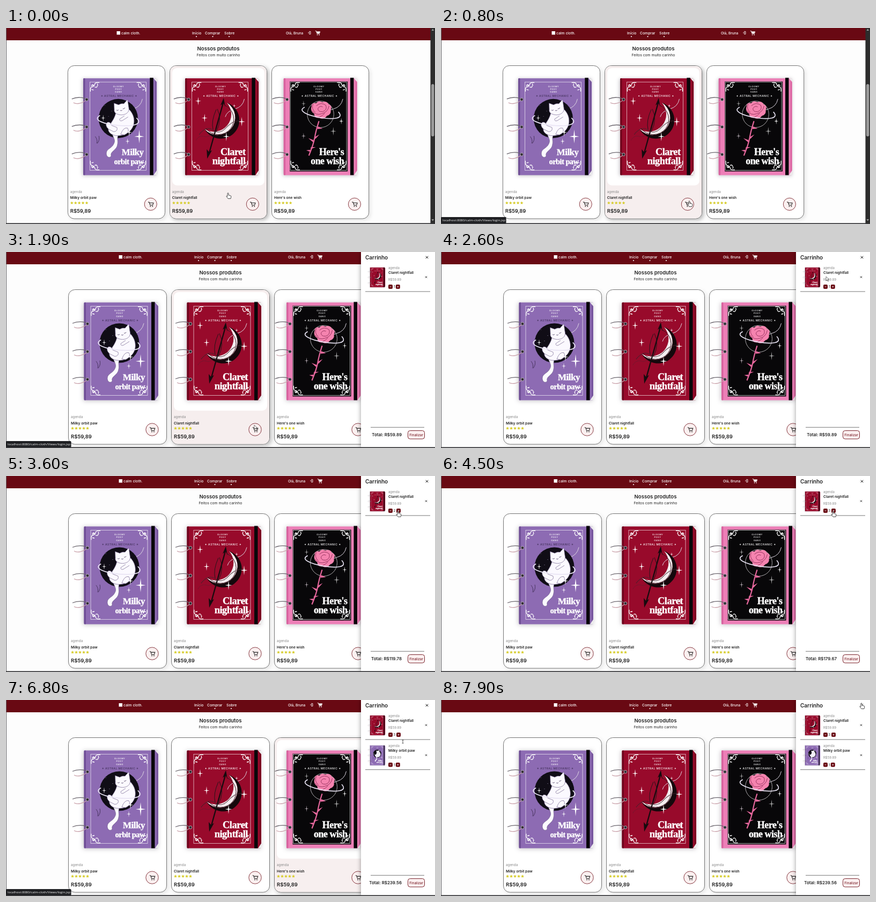
An HTML page that plays this animation: 800x367 px, repeating every 8000 ms.

```html
<!DOCTYPE html>
<html lang="pt">
<head>
<meta charset="utf-8">
<style>
html, body { margin: 0; width: 100%; height: 100%; overflow: hidden; background: #fdfdfd; }
svg { display: block; width: 100vw; height: 100vh; }
text { font-family: Inter, "Open Sans", sans-serif; fill: #222; }
.b { font-weight: 600; }
.w { fill: #fff; font-weight: 500; }
.g { fill: #888; }
.black { font-family: "Liberation Serif", "Noto Serif", serif; font-weight: 700; fill: #fff; stroke: #fff; stroke-width: .4; }
.book { filter: drop-shadow(-1px 1px 4px #3024384d); }
</style>
</head>
<body>
<svg id="stage" viewBox="0 0 800 367" preserveAspectRatio="none"></svg>
<script>
const WINE = '#690913', LOOP = 8000;
const stage = document.getElementById('stage');
const $ = id => document.getElementById(id);

const text = (x, y, size, str, cls = '', extra = '') =>
  `<text x="${x}" y="${y}" font-size="${size}" class="${cls}" ${extra}>${str}</text>`;
const rect = (x, y, w, h, fill, r = 0, extra = '') =>
  `<rect x="${x}" y="${y}" width="${w}" height="${h}" fill="${fill}" rx="${r}" ${extra}/>`;
const path = (d, fill = 'none', stroke = 'none', w = 1, extra = '') =>
  `<path d="${d}" fill="${fill}" stroke="${stroke}" stroke-width="${w}" ${extra}/>`;
const spark = (x, y, r, fill = '#fff') => {
  const k = r * .1;
  return path(`M${x} ${y - r}l${k} ${r - k} ${r * .6} ${k}-${r * .6} ${k}-${k} ${r - k}-${k}-${r - k}-${r * .6}-${k} ${r * .6}-${k}z`, fill);
};
const cross = (x, y, r) => path(`M${x - r} ${y - r}l${2 * r} ${2 * r}m0-${2 * r}l-${2 * r} ${2 * r}`, 'none', '#222', 1);
const cart = (x, y, s, color) => `<g transform="translate(${x} ${y}) scale(${s})">` +
  path('M-5-4h2l2 6h5l1.5-4.5h-8', 'none', color, 1.1) +
  `<circle cx="-.5" cy="4.3" r="1" fill="${color}"/><circle cx="3.7" cy="4.3" r="1" fill="${color}"/></g>`;

// Cover art, drawn in the coordinates of the first card
const orbit = (cx, cy, rx, ry, tilt) =>
  path(`M${cx - rx * .8} ${cy - ry * .5}C${cx - rx * 1.5} ${cy + ry} ${cx + rx * 1.5} ${cy + ry * 1.4} ${cx + rx * .8} ${cy - ry * .5}`,
    'none', '#e9e4f4', 1.7, `transform="rotate(${tilt} ${cx} ${cy})"`);

const cat = () => '<circle cx="211.500" cy="171" r="37" fill="#100d16"/>' +
  [...Array(14).keys()].map(i => `<circle cx="${186 + i * 37 % 52}" cy="${146 + i * 23 % 48}" r=".5" fill="#b9a9d8"/>`).join('') +
  '<g stroke="#75658f" stroke-width=".7" fill="#fbf9ff">' +
  '<path d="M203 194c-8 8 6 15 0 25c-4 9-14 9-14 18c0 9 9 9 9 4c-2-8 11-10 12-21c2-8-3-13 4-22z"/>' +
  '<path d="M230 152C244 164 245 184 233 195C222 206 198 207 193 194C191 183 203 178 207 160Z"/>' +
  '<path d="M204 154L203.500 142 212 145Q217 142 222 143L229 135 231 149C234 160 224 165 215 164C207 163 203 159 204 154Z"/>' +
  '<path d="M193 191q-8-8-2-13q6-1 8 6l10 4q2 7-6 8z"/>' +
  '<path d="M223 166l-9 6q0 5 5 3l11-7"/><path d="M216 201q5-14 13-12q5 8-6 13z"/></g>' +
  path('M208 155q2 2 4-.5m8-2q3 1 4-2m-9 5q2 2 4-.5', 'none', '#47395c', .8) +
  orbit(211, 174, 43, 13, 4) + spark(183, 170, 6) + spark(251, 205, 13) + spark(232, 197, 8) + spark(229, 214, 6) +
  path('M168 205q5 6 3 13m4-14q2 8-3 14', 'none', '#4a3561', 1);

const moon = () => path('M224 141A35 35 0 1 1 182 191A33 33 0 1 0 224 141', '#15080c') +
  path('M224 141A33 33 0 1 1 182 191A33 33 0 0 0 224 141', '#f4eef0') +
  path('M220 146A29 29 0 1 1 185 190', 'none', '#3b1620', 1) +
  path('M218 138L190 239', 'none', '#160b0e', 2.3) + path('M218 132l-6 14 6-4 3 7zM187 247l-1-18 4 5 6-3z', '#160b0e') +
  path('M204 154q-10 22-6 38m8-39q10 20-2 43', 'none', '#24151a', 1) +
  path('M172 201q14-17 26-8t25-5 28-13', 'none', '#40212a', 1.5, 'stroke-dasharray="1.5 1"') +
  path('M166 212q6-10 16-7t21-14', 'none', '#5b2030', 1, 'stroke-dasharray="1.5 1"') +
  spark(170, 138, 8) + spark(182, 170, 8) + spark(252, 177, 9) + spark(223, 205, 9) + spark(238, 147, 4);

const rose = () => '<circle cx="215" cy="163" r="25" fill="none" stroke="#d6d2d6" stroke-width=".8"/>' +
  '<g transform="translate(7 0)">' + path('M205 176q-6 19-8 31t-11 34', 'none', '#e5679c', 2.2) +
  path('M197 206l9-5-8 9zM195 212l-10-4 9 8zM190 225l9 0-10 4zM189 230l-8 1 7 3zM203 186l9 4-10 1z', '#e5679c') +
  path('M191 148q0-8 9-6q4-6 11-2q9-3 12 4q8 3 4 11q2 8-7 11q-6 8-14 4q-10 1-10-8q-8-5-5-14z', '#f583af') +
  path('M200 147q9-8 18-1q3 9-6 12q-9 1-9-6q4-6 9-3m-20 7q7 10 18 6q12-3 14-15m-28 20q10 5 20-6m-22-18q-4 10 4 16', 'none', '#8f2d58', .9) +
  orbit(209, 160, 40, 12, 8) + spark(176, 204, 6, '#b8aeb6') + spark(232, 195, 8, '#aaa') + spark(247, 176, 6) + spark(176, 143, 6, '#aaa') + '</g>';

// shift: how far the cover sits from the common place
const books = [
  { cover: '#8d6bb3', dark: '#704f96', art: cat, title: ['Milky', 'orbit paw'], sizes: [17, 14.5], shift: 0 },
  { cover: '#980a2b', dark: '#6f051d', art: moon, title: ['Claret', 'nightfall'], sizes: [18.5, 18.5], shift: 0 },
  { cover: '#ed7fb7', dark: '#d8639f', art: rose, title: ["Here's", 'one wish'], sizes: [18, 18], shift: -6.5 }
];
const names = books.map(b => b.title.join(' '));

const corner = (x, y, sx, sy) => `<g transform="translate(${x} ${y}) scale(${sx} ${sy})">` +
  path('M0 17q-1-9 4-9q4-1 1-4q-4 0-2 4M17 0q-9-1-9 4q-1 4-4 1M8 8q4 3 5-2M2 13l4 1M13 2l1 4', 'none', '#fff', 1.3) + '</g>';

function book(b, i) {
  const rings = [135, 187, 239].map(y =>
    path(`M127 ${y + 6}C133 ${y + 10} 144 ${y + 7} 150 ${y + 2}`, 'none', '#c9a0a9', 1.2) +
    path(`M152 ${y}C146 ${y - 5} 133 ${y - 5} 124 ${y - 1}`, 'none', '#6b666e', 1.3) +
    `<circle cx="152" cy="${y}" r="2.800" fill="#312b33" stroke="#b9b4bb" stroke-width=".9"/>`).join('');
  const line = (j, y) => text(259, y, b.sizes[j], b.title[j], 'black', 'text-anchor="end" letter-spacing="-.5"');
  const center = 'text-anchor="middle" letter-spacing=".5"';
  return `<g id="book${i}"><g transform="translate(${b.shift} -.5)"><g class="book">` +
    rect(145.5, 95, 138.5, 183, b.cover, 2) + rect(145.5, 95, 3.5, 183, b.dark, 1) + rect(281, 98, 2, 177, b.dark) +
    path('M278 95h6v7zM278 278h6v-9z', '#eee') + '</g>' +
    (i == 2 ? rect(157, 101, 109, 170, '#080709') : '') +
    rect(158, 102, 106, 167, 'none', 0, 'stroke="#fff" stroke-opacity=".8" stroke-width=".8"') +
    corner(159, 103, 1, 1) + corner(263, 103, -1, 1) + corner(159, 268, 1, -1) + corner(263, 268, -1, -1) +
    ['GLOOMY', 'POSY', 'GANG'].map((s, j) => text(212, 111.5 + j * 5.3, 4, s, 'w b', center)).join('') +
    text(213, 130, 5, '✦ ASTRAL MECHANIC ✦', i ? 'w b' : 'b', center + (i ? '' : ' style="fill:#4c3866"')) +
    path('M257 134q-3 15-18 19t-18 15', 'none', '#ddd6e2', 1) +
    b.art() + line(0, 240.5) + line(1, 257) +
    rect(271, 94, 6.5, 184, '#09070a') + rings + '</g></g>';
}

function card(b, i) {
  const star = x => path(`M${x} 327l.9 2 2.100.2-1.600 1.400.5 2.100-1.900-1.100-1.900 1.100.5-2.100-1.600-1.400 2.100-.2z`, '#d6cc2c');
  return `<g transform="translate(${i * 192} 0)">` +
    `<g id="hover${i}">${rect(119, 73, 184, 290, '#0004', 12, 'filter="url(#blur)"')}</g>` +
    rect(116.5, 70.5, 183, 289.5, '#fff', 12, 'stroke="#666" stroke-width=".9"') +
    `<g id="tint${i}">${rect(117, 71, 182, 288.5, '#f6eeee', 11.5)}${rect(121, 75, 174, 222, '#fff', 9)}</g>` +
    `<use href="#book${i}"/>` +
    text(121, 311, 6.3, 'agenda', 'g') + text(121, 323, 6.7, names[i], 'b') +
    [124, 131, 138, 145, 152].map(star).join('') + text(121, 348.5, 9.5, 'R$59,89', 'b') +
    `<circle cx="272.500" cy="332.500" r="11.700" fill="#fbf0f0" stroke="${WINE}" stroke-width=".8"/>` +
    cart(272.5, 332.5, .95, '#222') + '</g>';
}

function item(i, y, id) {
  const button = (x, plus) => rect(x, 61, 8, 8, WINE, 2) +
    path(`M${x + 2.5} 65h3` + (plus ? 'm-1.500-1.500v3' : ''), 'none', '#fff', .8);
  return `<g id="${id}" transform="translate(0 ${y})">` +
    `<use href="#book${i}" transform="translate(649.400 9.700) scale(.203)"/>` +
    text(713, 31.5, 5.9, 'agenda', 'g') + text(713, 40.5, 6.7, names[i], 'b') + text(713, 53.5, 6, 'R$59.89', 'g') +
    button(713, false) + text(724.3, 67.4, 6.3, '1', '', `id="${id}Qty" text-anchor="middle"`) +
    `<g id="${id}Plus">${button(728, true)}</g>` + cross(783.5, 47, 1.5) +
    rect(670, 73.6, 121, .9, '#666') + '</g>';
}

const nav = [['Início', 351, 359], ['Comprar', 375, 389.5], ['Sobre', 411, 420]];
stage.innerHTML =
  `<defs><filter id="blur" x="-20%" y="-20%" width="140%" height="140%"><feGaussianBlur stdDeviation="4"/></filter>${books.map(book).join('')}</defs>` +
  rect(0, 0, 800, 367, '#fdfdfd') + rect(0, 0, 800, 23, WINE) +
  '<g id="top">' + rect(210.5, 6, 6.5, 6.5, '#fff') + text(219, 11.7, 6.8, 'calm cloth.', 'w') +
  nav.map(([s, x, dot]) => text(x, 11.7, 6.8, s, 'w') + `<circle cx="${dot}" cy="16" r="1.100" fill="#fff"/>`).join('') +
  text(526, 11.7, 6.5, 'Olá, Bruna', 'w') +
  path('M569 6.500h3v5h-3m-2-2.500h3.500m-1.300-1.300l1.300 1.300-1.300 1.300', 'none', '#fff', .8) +
  cart(585, 9, .85, '#fff') + path('M583 7h6l-1 3h-4z', '#fff') +
  text(400, 41.5, 9.6, 'Nossos produtos', 'b', 'text-anchor="middle"') +
  text(400, 52.5, 6.8, 'Feitos com muito carinho', '', 'text-anchor="middle"') + '</g>' +
  `<g id="cards">${books.map(card).join('')}</g>` +
  '<g id="panel">' + rect(662, 0, 148, 367, '#0006', 0, 'filter="url(#blur)"') + rect(662, 0, 138, 367, '#fff') +
  text(670, 14.2, 10, 'Carrinho', 'b') + cross(785, 10, 2.3) +
  item(1, 0, 'first') + item(0, 56.3, 'second') + rect(680, 327.8, 100, .9, '#666') +
  text(738, 345, 7.9, '', 'b', 'id="total" text-anchor="end"') +
  rect(749.5, 334.5, 31, 15.5, '#fdf1f1', 4, `stroke="${WINE}" stroke-width=".9"`) +
  text(765, 344.6, 6.5, 'Finalizar', '', `text-anchor="middle" style="fill:${WINE}"`) + '</g>' +
  '<g id="bar">' + rect(791.5, 0, 8.5, 367, '#2c2c2c') + rect(793, 105, 5.5, 98, '#9b9b9b', 2.7) +
  path('M793.500 5l2.300-3.500 2.300 3.500zM793.500 358l2.300 3.500 2.300-3.500z', '#9b9b9b') + '</g>' +
  rect(0, 0, 1, 367, '#66666a') + rect(0, 365.3, 800, 1.7, '#39393c') +
  '<g id="status">' + rect(0, 354, 121.5, 11.8, '#1f2023', 1.5) +
  `<text x="3" y="362" font-size="6.100" style="font-family:'Open Sans',sans-serif;fill:#f4f4f4">localhost:8080/calm-cloth/Views/login.jsp</text></g>` +
  '<g id="cursor">' +
  path('M-1 .5q1-1.500 2 0v3.500l4 1q1 .3.800 2l-.8 3.500h-5l-3-4q0-1.300 1-1l1 1z', '#fff', '#222', .8, 'id="hand"') +
  path('M0 0v8l2-2 1.500 3 1-.5-1.400-3h2.600z', '#fff', '#222', .6, 'id="arrow"') +
  path('M-1.500 0h3m-1.500 0v6m-1.500 0h3', 'none', '#222', .7, 'id="beam"') + '</g>';

// time, x, y, pointer shape from then on
const track = [
  [0, 414, 309, 'hand'], [250, 414, 309, 'hand'], [650, 463, 324, 'hand'], [1900, 463, 324, 'arrow'],
  [2500, 718, 46, 'arrow'], [2700, 718, 46, 'arrow'], [2950, 731, 66, 'hand'], [4600, 731, 66, 'arrow'],
  [5450, 300, 300, 'arrow'], [5750, 273, 330, 'hand'], [6300, 273, 330, 'arrow'],
  [6750, 740, 75, 'beam'], [6900, 740, 75, 'arrow'], [7250, 784, 6, 'hand'], [LOOP, 784, 6, 'hand']
];
// card, hover start, hover end
const hovers = [[1, -500, 2020], [2, 2100, 2250], [2, 4800, 4950], [1, 4950, 5470], [0, 5500, 6370], [1, 6400, 6520], [2, 6520, 6780]];
const clamp = v => Math.max(0, Math.min(1, v));
const show = (id, on) => $(id).style.display = on ? '' : 'none';

function draw(t) {
  const wide = t >= 890;
  $('top').setAttribute('transform', `translate(${wide ? 0 : -4} 0)`);
  $('cards').setAttribute('transform', wide ? '' : 'translate(0 .7) scale(.99)');
  show('bar', !wide);
  show('panel', wide);
  $('panel').setAttribute('transform', `translate(${138 * (1 - clamp((t - 890) / 600)) ** 2.4} 0)`);

  books.forEach((_, i) => {
    const level = Math.max(...hovers.map(([c, a, b]) => c == i ? clamp((t - a) / 180) * (1 - clamp((t - b) / 180)) : 0));
    $('hover' + i).style.opacity = .35 + .65 * level;
    $('tint' + i).style.opacity = level;
  });

  const qty = t < 3300 ? 1 : t < 3900 ? 2 : 3, added = t >= 6200;
  $('firstQty').textContent = qty;
  $('firstPlus').setAttribute('transform', `translate(${qty > 1 ? 0 : -1.2} 0)`);
  $('secondPlus').setAttribute('transform', 'translate(-1.2 0)');
  show('second', added);
  $('total').textContent = 'Total: R$' + (59.89 * (qty + added)).toFixed(2);
  show('status', t >= 700 && t < 2150 || t >= 6050 && t < 7000);

  const k = track.findIndex(p => p[0] > t), [t0, x0, y0, shape] = track[k - 1], [t1, x1, y1] = track[k];
  const p = (t - t0) / (t1 - t0), e = p * p * (3 - 2 * p);
  $('cursor').setAttribute('transform', `translate(${x0 + (x1 - x0) * e} ${y0 + (y1 - y0) * e})`);
  ['hand', 'arrow', 'beam'].forEach(s => show(s, s == shape));
}

const start = performance.now();
function tick() {
  draw((performance.now() - start) % LOOP);
  requestAnimationFrame(tick);
}
tick();
</script>
</body>
</html>
```
